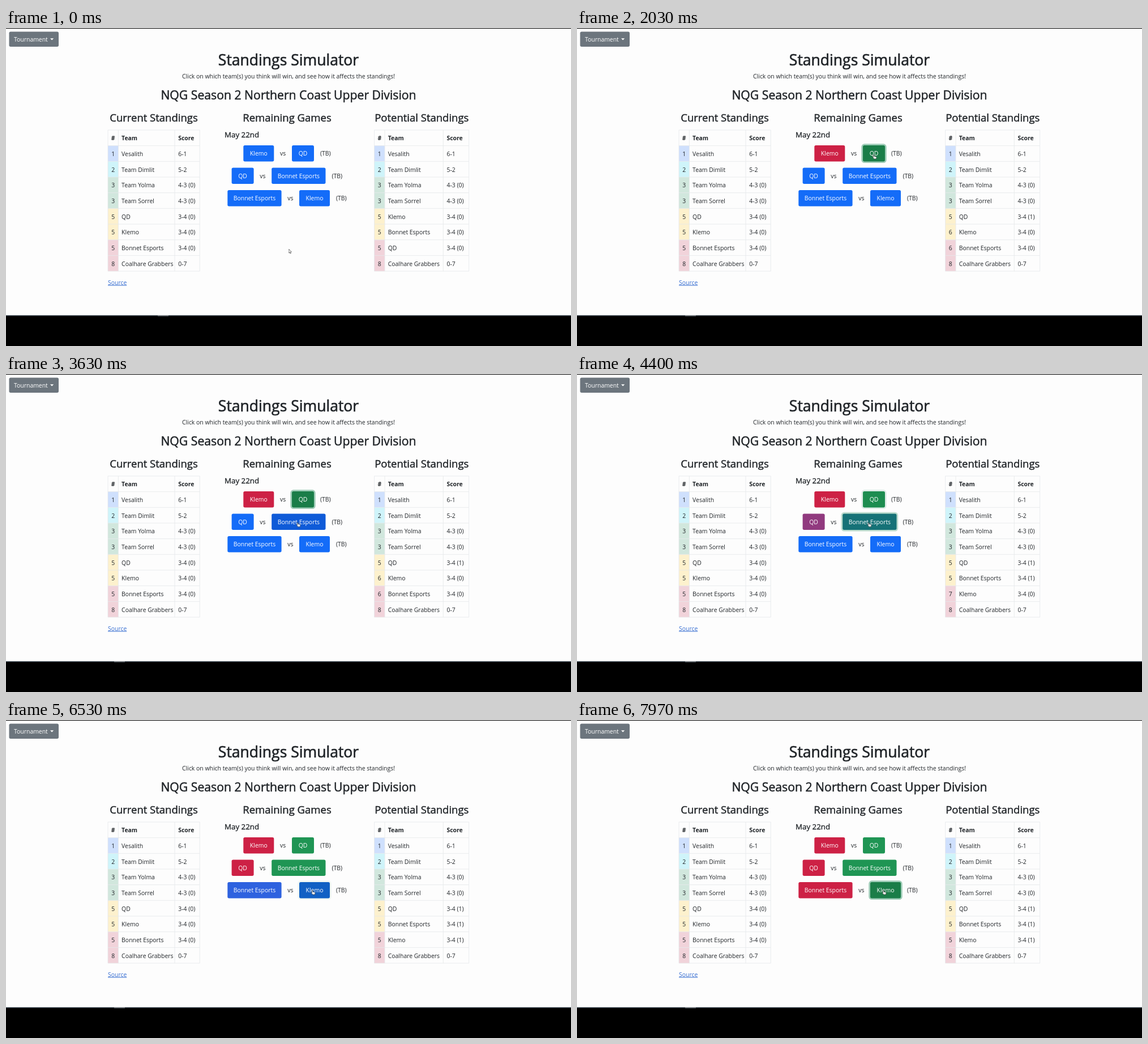
Write an HTML page that moves like this. It is 998 px wide and 561 px high and loops after 8000 ms.

```html
<!DOCTYPE html>
<html lang="en">
<head>
<meta charset="utf-8">
<title>Standings Simulator</title>
<style>
html, body { margin: 0; width: 100%; height: 100%; overflow: hidden; background: #fdfdfd; }
svg { display: block; width: 100%; height: 100%; }
text { font: 10.43px "Open Sans", "Noto Sans", sans-serif; fill: #212529; }
/* A thin outline gives the headings a medium weight. */
.h1, .h2, .h3, .h4 { stroke: #212529; stroke-width: .025em; stroke-linejoin: round; }
.h1 { font-size: 26.55px; }
.h2 { font-size: 21.2px; }
.h3 { font-size: 18.5px; }
.h4 { font-size: 13.3px; }
.th { font-weight: 700; }
.mid { text-anchor: middle; }
.light { fill: #fff; }
.link { fill: #3a70d2; text-decoration: underline; }
.grid { fill: none; stroke: #e5e7ea; stroke-width: .8; }

.btn { fill: #146cf8; stroke: #9eccb700; stroke-width: 5.4; paint-order: stroke;
  animation: 8s linear infinite; }
.lose1 { animation-name: lose1; }
.lose2 { animation-name: lose2; }
.lose3 { animation-name: lose3; }
.win1 { animation-name: win1; }
.win2 { animation-name: win2; }
.win3 { animation-name: win3; }
@keyframes lose1 { 0%, 23.125% { fill: #146cf8 } 25%, 100% { fill: #cd2145 } }
@keyframes lose2 { 0%, 53.75% { fill: #146cf8 } 55.625%, 100% { fill: #cd2145 } }
@keyframes lose3 { 0%, 81.375% { fill: #146cf8 } 83.25%, 100% { fill: #cd2145 } }
@keyframes win1 {
  0%, 13.5% { fill: #146cf8 }
  15.375%, 23.125% { fill: #0f5bd8; stroke: #9eccb700 }
  25%, 53.75% { fill: #1a7d48; stroke: #9eccb7 }
  55.625%, 100% { fill: #1f9554; stroke: #9eccb700 }
}
@keyframes win2 {
  0%, 42.875% { fill: #146cf8 }
  44.75%, 53.75% { fill: #0f5bd8; stroke: #9eccb700 }
  55.625%, 80% { fill: #1a7d48; stroke: #9eccb7 }
  81.25%, 100% { fill: #1f9554; stroke: #9eccb700 }
}
@keyframes win3 {
  0%, 71.375% { fill: #146cf8 }
  73.25%, 81.375% { fill: #0f5bd8; stroke: #9eccb700 }
  83.25%, 100% { fill: #1a7d48; stroke: #9eccb7 }
}

.state { visibility: hidden; animation: 8s step-end infinite; }
.state0 { animation-name: state0; }
.state1 { animation-name: state1; }
.state2 { animation-name: state2; }
.state3 { animation-name: state3; }
@keyframes state0 { 0% { visibility: visible } 23.125%, 100% { visibility: hidden } }
@keyframes state1 { 0% { visibility: hidden } 23.125% { visibility: visible } 53.75%, 100% { visibility: hidden } }
@keyframes state2 { 0% { visibility: hidden } 53.75% { visibility: visible } 81.375%, 100% { visibility: hidden } }
@keyframes state3 { 0% { visibility: hidden } 81.375%, 100% { visibility: visible } }

.focus { animation: focus 8s step-end infinite; }
@keyframes focus { 0% { transform: none } 23.125%, 100% { transform: translate(-77px, 0) } }

.cursor { animation: move 8s linear infinite; }
.cursor path { fill: #fff; stroke: #333; stroke-width: .7; stroke-linejoin: round; }
@keyframes move {
  0%, 5% { transform: translate(499.5px, 390px); animation-timing-function: ease-in-out }
  14.125% { transform: translate(523.5px, 229px) }
  16% { transform: translate(523.5px, 229px) }
  21%, 40.625% { transform: translate(523.5px, 223px) }
  44.375%, 66.875% { transform: translate(514.5px, 261.5px) }
  70.375% { transform: translate(518.5px, 282px) }
  74.375% { transform: translate(540px, 298px) }
  78%, 100% { transform: translate(540.5px, 300px) }
}
.arrow { animation: arrow 8s step-end infinite; }
.hand { animation: hand 8s step-end infinite; }
@keyframes arrow {
  0%, 41.8%, 69.2% { visibility: visible }
  13.375%, 42.875%, 71.375%, 100% { visibility: hidden }
}
@keyframes hand {
  0%, 41.8%, 69.2% { visibility: hidden }
  13.375%, 42.875%, 71.375%, 100% { visibility: visible }
}
</style>
</head>
<body>
<svg viewBox="0 0 998 561" preserveAspectRatio="none">
  <rect width="998" height="561" fill="#fdfdfd"/>
  <rect width="998" height="1.2" fill="#222"/>
  <rect y="506.8" width="998" height="55" fill="#1f2a33"/>
  <rect y="508.5" width="998" height="53" fill="#000"/>
  <rect class="focus" x="268" y="507" width="19" height="1.4" fill="#6c7277"/>
  <g id="page"></g>
  <g class="cursor">
    <path class="arrow" d="M0 0V7L1.6 5.6 2.7 8 3.7 7.5 2.7 5.2 4.8 5Z"/>
    <path class="hand" d="M0 .8Q.8-.3 1.5.8V3.2L4.8 4Q5.6 4.4 5.4 5.5L4.8 8H1.4L-1.2 4.9Q-1 4 0 5Z"/>
  </g>
</svg>
<script>
const ROW = 27.67, TOP = 180;
const RANK_COLORS = ['#cfe0fd', '#cff4fa', '#d1e7dd', '#d1e7dd', '#fdf1cd', '#fdf1cd', '#f1d3da', '#f1d3da'];

const text = (x, y, str, cls = '') => `<text x="${x}" y="${y}" class="${cls}">${str}</text>`;
const heading = (x, y, str, cls) => text(x, y, str, cls + ' mid');

// Column edges are [left, team, score, right].
const baseline = i => TOP + 18.2 + ROW * i;
const row = ([left, team, score], i, [rank, name, result], cls = '') =>
  text((left + team) / 2, baseline(i), rank, cls + ' mid') +
  text(team + 5.7, baseline(i), name, cls) +
  text(score + 6.2, baseline(i), result, cls);

function frame(cols) {
  const [left, team, , right] = cols;
  const bottom = TOP + ROW * 9;
  const cells = RANK_COLORS.map((color, i) =>
    `<rect x="${left}" y="${TOP + ROW * (i + 1)}" width="${team - left}" height="${ROW}" fill="${color}"/>`).join('');
  let lines = cols.map(x => `M${x} ${TOP}V${bottom}`).join('');
  for (let i = 0; i <= 9; i++) lines += `M${left} ${TOP + ROW * i}H${right}`;
  return cells + `<path class="grid" d="${lines}"/>` + row(cols, 0, ['#', 'Team', 'Score'], 'th');
}

const rows = (cols, first, list) => list.map((data, i) => row(cols, first + i, data)).join('');

function button(x, y, width, label, cls) {
  return `<rect class="btn ${cls}" x="${x}" y="${y}" width="${width}" height="28.4" rx="2.7"/>` +
    text(x + width / 2, y + 18.2, label, 'mid light');
}

function game(n, y, [x1, w1, loser], [x2, w2, winner]) {
  return button(x1, y, w1, loser, 'lose' + n) +
    text((x1 + w1 + x2) / 2, y + 18.2, 'vs', 'mid') +
    button(x2, y, w2, winner, 'win' + n) +
    text(x2 + w2 + 11, y + 18.2, '(TB)');
}

const [A, B, C] = ['QD', 'Klemo', 'Bonnet Esports'];
const leaders = [
  [1, 'Vesalith', '6-1'], [2, 'Team Dimlit', '5-2'],
  [3, 'Team Yolma', '4-3 (0)'], [3, 'Team Sorrel', '4-3 (0)']
];
const last = [[8, 'Coalhare Grabbers', '0-7']];
const tied = (rank, name, wins) => [rank, name, `3-4 (${wins})`];
const states = [
  [tied(5, B, 0), tied(5, C, 0), tied(5, A, 0)],
  [tied(5, A, 1), tied(6, B, 0), tied(6, C, 0)],
  [tied(5, A, 1), tied(5, C, 1), tied(7, B, 0)],
  [tied(5, A, 1), tied(5, C, 1), tied(5, B, 1)]
];
const current = [180, 198.4, 298, 342.2];
const potential = [650.6, 669, 772.3, 817.6];

document.getElementById('page').innerHTML =
  '<rect x="5.5" y="6.5" width="87.5" height="26.5" rx="2.7" fill="#6c757d"/>' +
  text(14, 23.8, 'Tournament', 'light') +
  '<path d="M78 18.3h6.2l-3.1 3.2z" fill="#fff"/>' +
  heading(499, 66, 'Standings Simulator', 'h1') +
  heading(499, 89, 'Click on which team(s) you think will win, and see how it affects the standings!', '') +
  heading(499, 125.6, 'NQG Season 2 Northern Coast Upper Division', 'h2') +
  heading(261, 165, 'Current Standings', 'h3') +
  heading(496.5, 165, 'Remaining Games', 'h3') +
  heading(734.3, 165, 'Potential Standings', 'h3') +
  text(386, 193, 'May 22nd', 'h4') +
  game(1, 207, [419.3, 54, B], [505, 39, A]) +
  game(2, 246.5, [398.6, 39, A], [469.2, 95.3, C]) +
  game(3, 286, [391.3, 95.3, C], [518, 54, B]) +
  frame(current) + rows(current, 1, leaders) +
  rows(current, 5, [tied(5, A, 0), tied(5, B, 0), tied(5, C, 0), ...last]) +
  frame(potential) + rows(potential, 1, leaders) + rows(potential, 8, last) +
  states.map((list, i) => `<g class="state state${i}">${rows(potential, 5, list)}</g>`).join('') +
  text(180, 452.5, 'Source', 'link');
</script>
</body>
</html>
```
